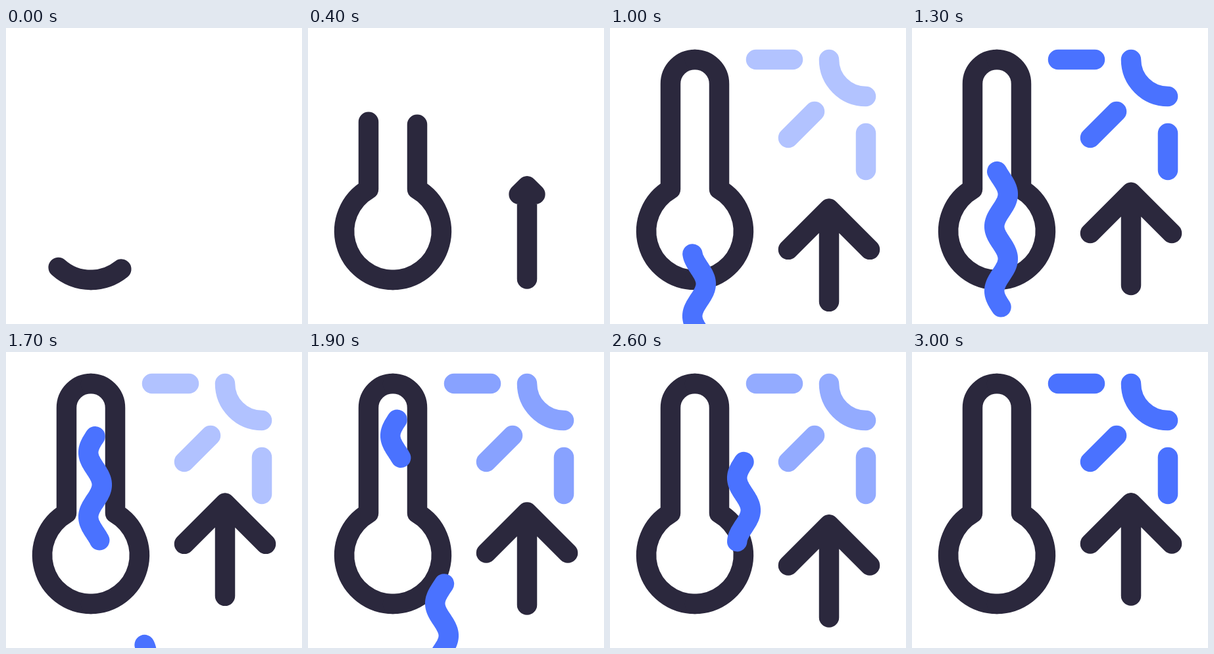
Recreate the animation shown at these times as an HTML page with a canvas. Size 450 px wide and 450 px high, loop 3.1 s.

```html
<!DOCTYPE html>
<html lang="en">
<head>
<meta charset="utf-8">
<title>Rising heat</title>
<style>
  html, body { margin: 0; overflow: hidden; background: #fff; }
  canvas { display: block; }
</style>
</head>
<body>
<canvas id="stage" width="450" height="450"></canvas>
<script>
const ctx = document.getElementById('stage').getContext('2d');
const LOOP = 3100, STEP = 100;
const DARK = '#2b283d', BLUE = '#4a72ff';
const WAVE = 98, WAVE_LENGTH = WAVE * 2.5, SWING = 10.3;

const halves = [
  'M129 383A74 74 0 0 1 92 245V85A37 37 0 0 1 129 48',
  'M129 383A74 74 0 0 0 166 245V85A37 37 0 0 0 129 48'
].map(d => new Path2D(d));
const sun = new Path2D('M222 48H278M333 48A56 56 0 0 0 389 104M271 167L311 127M389 160V216');

const progress = (t, from, to) => Math.min(1, Math.max(0, (t - from) / (to - from)));
const smooth = p => (1 - Math.cos(Math.PI * p)) / 2;

function keyed(t, keys, ease) {
  if (t <= keys[0][0]) return keys[0][1];
  for (let i = 1; i < keys.length; i++) {
    const [t0, v0] = keys[i - 1], [t1, v1] = keys[i];
    if (t <= t1) return v0 + (v1 - v0) * ease(progress(t, t0, t1));
  }
  return keys[keys.length - 1][1];
}

function stroke(path, color, length) {
  ctx.strokeStyle = color;
  ctx.setLineDash(length === undefined ? [] : [length, 2000]);
  ctx.stroke(path);
}

function thermometer(t) {
  const grown = 362 * progress(t, 0, 600);
  stroke(halves[0], DARK, 54 + grown);
  stroke(halves[1], DARK, 50 + grown);
}

function arrow(t) {
  const shaft = progress(t, 50, 400), head = 62 * progress(t, 350, 600);
  if (!shaft) return;
  const tip = 229 + keyed(t, [[160, 0], [900, 48], [1640, 0], [2340, 48], [3040, 0]], smooth);
  const path = new Path2D();
  path.moveTo(333, tip + 141);
  path.lineTo(333, tip + 141 * (1 - shaft));
  if (head) {
    path.moveTo(333 - head, tip + head);
    path.lineTo(333, tip);
    path.lineTo(333 + head, tip + head);
  }
  stroke(path, DARK);
}

function rays(t) {
  ctx.globalAlpha = keyed(t, [[795, 0], [1250, 1], [1300, 1], [1710, .43],
    [2150, 1], [2200, 1], [2590, .59], [2980, 1]], smooth);
  stroke(sun, BLUE);
  ctx.globalAlpha = 1;
}

// A rising wave: its head runs up the path first, then its tail follows.
function stream(t, { x, side, top, speed, head, tail }) {
  const start = WAVE_LENGTH * (1 - progress(t, ...head));
  const end = WAVE_LENGTH * (1 - progress(t, ...tail));
  if (start >= end) return;
  const y = top - speed * t, path = new Path2D();
  for (let s = start; s < end + 2; s += 2) {
    const d = Math.min(s, end);
    path.lineTo(x + side * SWING * Math.sin(d / WAVE * 2 * Math.PI), y + d);
  }
  stroke(path, BLUE);
}

const streams = [
  { x: 135.5, side: -1, top: 345, speed: .1275, head: [590, 1434], tail: [1526, 2016] },
  { x: 203.5, side: -1, top: 511.5, speed: .1325, head: [1440, 2180], tail: [2375, 2820] }
];

function render(t) {
  ctx.fillStyle = '#fff';
  ctx.fillRect(0, 0, 450, 450);
  ctx.lineWidth = 30.5;
  ctx.lineCap = ctx.lineJoin = 'round';
  thermometer(t);
  arrow(t);
  rays(t);
  streams.forEach(s => stream(t, s));
}

const began = performance.now();
function tick() {
  const t = (performance.now() - began) % LOOP;
  render(Math.floor(t / STEP) * STEP);
  requestAnimationFrame(tick);
}
tick();
</script>
</body>
</html>
```
